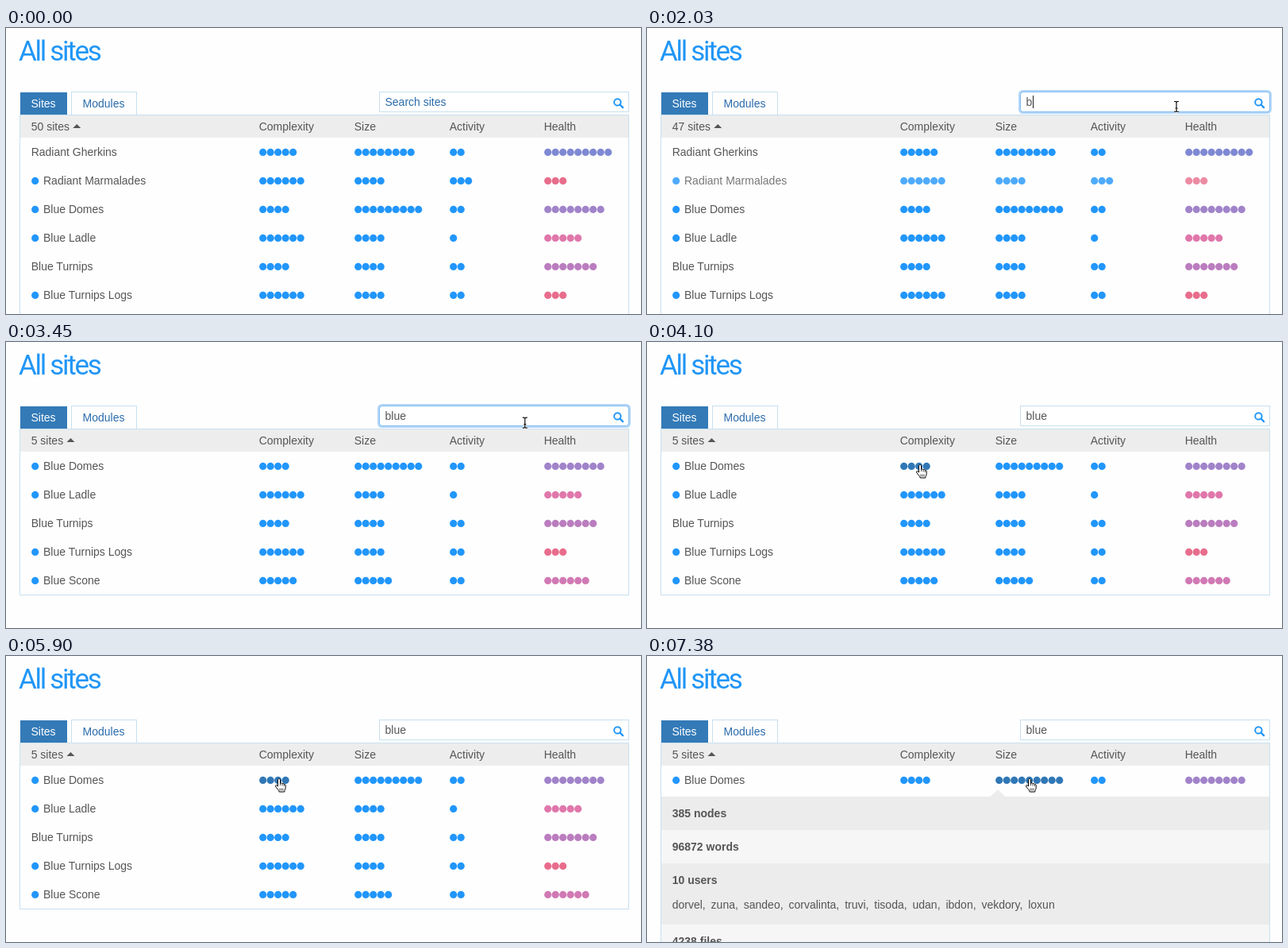
Animation, 800 px wide and 360 px high, one loop 8000 ms. Source, as an HTML page:

```html
<!DOCTYPE html>
<html lang="en">
<head>
<meta charset="utf-8">
<title>All sites</title>
<style>
  html, body { margin: 0; width: 100%; height: 100%; overflow: hidden; background: #fefefe; }
  svg { display: block; }
  text { font: 14px "Liberation Sans", Arial, sans-serif; fill: #555; white-space: pre; }
  .title { font: 35px Roboto, sans-serif; letter-spacing: -2.3px; fill: #2196f6; }
  .bold { font-weight: bold; }
  .list { word-spacing: 3px; }
  .link { fill: #2a6bab; }
  .blue { fill: #2196fb; }
  .hot { fill: #3077b6; }
  .line { fill: none; stroke: #c8e0ef; }
  .cursor { fill: #fff; stroke: #000; stroke-linejoin: round; }
</style>
</head>
<body>
<svg id="stage" width="800" height="360" viewBox="0 0 800 360"></svg>
<script>
const LOOP = 8000, ROW = 36, PANEL_TOP = 177;
const COLS = [319, 439, 559, 678];
const HEALTH = { 3: '#e86d8c', 5: '#e077ab', 6: '#d179b4', 7: '#ba7dbf', 8: '#a183c9', 9: '#7f89d3' };

// name, is child, dots per column
const SITES = [
  ['Radiant Gherkins', 0, [5, 8, 2, 9]],
  ['Radiant Marmalades', 1, [6, 4, 3, 3]],
  ['Blue Domes', 1, [4, 9, 2, 8]],
  ['Blue Ladle', 1, [6, 4, 1, 5]],
  ['Blue Turnips', 0, [4, 4, 2, 7]],
  ['Blue Turnips Logs', 1, [6, 4, 2, 3]],
  ['Blue Scone', 1, [5, 5, 2, 6]]
];

const MODULES = [
  'actions_permissions, admin_menu, admin_menu_toolbar, aggregator, auto_image_style, better_exposed_filters,',
  'block, blog, book, cck, checklistapi, checklistapi_example, clone, color, comment, config_perms, contact,',
  'content_access, content_access_rules, content_migrate, contextual, dashboard, dblog, entity, entity_token, field,',
  'field_collection_table, field_sql_storage, field_ui, file, filter, forum, help, httpbl, image, linkit, list, locale,',
  'mediaelement, memcache, memcache_admin, menu, navigation404, node, number, openid, options, overlay,',
  'panels_extra_layouts, path, permissions_lock, persistent_menu_items, phone, php, poll, profile, rdf, rules,',
  'rules_admin, rules_i18n, rules_scheduler, saferpermissions, search, seo_checklist, shortcut, simpletest,'
];
const USERS = 'dorvel, zuna, sandeo, corvalinta, truvi, tisoda, udan, ibdon, vekdory, loxun';

const stage = document.getElementById('stage');

function add(parent, tag, attrs = {}, text) {
  const el = document.createElementNS('http://www.w3.org/2000/svg', tag);
  for (const k in attrs) el.setAttribute(k, attrs[k]);
  if (text) el.textContent = text;
  return parent.appendChild(el);
}
const group = (parent = stage) => add(parent, 'g');
const label = (parent, x, y, text, cls = '') => add(parent, 'text', { x, y, class: cls }, text);
const box = (parent, x, y, width, height, attrs) => add(parent, 'rect', { x, y, width, height, ...attrs });
const path = (parent, d, attrs) => add(parent, 'path', { d, ...attrs });
const show = (el, on) => el.setAttribute('visibility', on ? 'visible' : 'hidden');
const move = (el, x, y) => el.setAttribute('transform', `translate(${x} ${y})`);

function dots(parent, x, count, attrs) {
  const g = add(parent, 'g', attrs);
  for (let i = 0; i < count; i++) add(g, 'circle', { cx: x + 4.7 + i * 9.5, cy: 0.4, r: 4.6 });
  return g;
}

// Rows
const rows = SITES.map(([name, child, counts]) => {
  const g = group();
  if (child) add(g, 'circle', { cx: 36.7, cy: 0.4, r: 4.6, class: 'blue' });
  label(g, child ? 47 : 31.7, 5, name);
  const cells = counts.map((n, i) =>
    dots(g, COLS[i], n, i < 3 ? { class: 'blue' } : { fill: HEALTH[n] }));
  return { g, cells };
});

// Detail panels
function makePanel(tipX) {
  const g = group();
  path(g, `M${tipX - 10} 177.5l10-9.5 10 9.5z`, { fill: '#ececec' });
  const view = add(g, 'svg', { x: 0, y: PANEL_TOP, width: 800, height: 190, overflow: 'hidden' });
  return { g, view };
}
const modules = makePanel(322), size = makePanel(442);

box(modules.view, 18, 0, 767, 190, { fill: '#ececec' });
const moduleText = group(modules.view);
label(moduleText, 31.7, 26, '94 modules enabled', 'bold');
MODULES.forEach((line, i) => label(moduleText, 31.7, 57 + i * 21, line, 'list'));

[['385 nodes', 0, 42], ['96872 words', 42, 42], ['10 users', 84, 77], ['4238 files', 161, 42]]
  .forEach(([text, y, h], i) => {
    box(size.view, 18, y, 767, h, { fill: i % 2 ? '#f6f6f6' : '#ececec' });
    label(size.view, 31.7, y + 26, text, 'bold');
  });
label(size.view, 31.7, 141, USERS, 'list');

// Page header and table head
label(stage, 16, 41, 'All sites', 'title');
box(stage, 18, 110, 767, 28, { fill: '#ededed' });
const frame = box(stage, 17.5, 109.5, 767, 300, { class: 'line' });
box(stage, 18, 81, 59, 28, { fill: '#337ab7' });
label(stage, 31.5, 100, 'Sites').style.fill = '#fff';
box(stage, 82.5, 80.5, 82, 29, { class: 'line' });
label(stage, 96.5, 100, 'Modules', 'link');
const total = label(stage, 31.7, 129, '');
const sortMark = path(stage, 'M0 5l5-5 5 5z', { fill: '#555' });
['Complexity', 'Size', 'Activity', 'Health'].forEach((t, i) => label(stage, COLS[i] - 0.3, 129, t));

// Search field
box(stage, 470.5, 80.5, 314, 25, { fill: '#fff', stroke: '#c8e0ef' });
const ring = group();
box(ring, 469.5, 79.5, 316, 27, { rx: 4, fill: 'none', stroke: '#b4d7f8', 'stroke-width': 3 });
box(ring, 470.5, 80.5, 314, 25, { rx: 3, fill: 'none', stroke: '#83bdf0' });
const hint = label(stage, 477.5, 98, 'Search sites', 'link');
const query = label(stage, 477.5, 98, '');
const caret = box(stage, 478, 85, 1, 16, { fill: '#222' });
add(stage, 'circle', { cx: 770.4, cy: 93.4, r: 4.2, fill: 'none', stroke: '#2196f6', 'stroke-width': 2 });
path(stage, 'M773.5 96.5l3.6 3.6', { stroke: '#2196f6', 'stroke-width': 2.4, 'stroke-linecap': 'round' });

// Pointers, drawn around their hot spot
const pointers = { arrow: group(), beam: group(), hand: group() };
path(pointers.arrow, 'M0 0v14l3.2-3 2.2 5 2.4-1-2.2-5h4.4z',
  { fill: '#000', stroke: '#fff', 'stroke-linejoin': 'round' });
const beam = 'M-3-6.5h2l1 1 1-1h2M0-5.5v11M-3 6.500h2l1-1 1 1h2M-1.500 2h3';
path(pointers.beam, beam, { fill: 'none', stroke: '#fff', 'stroke-width': 2.6 });
path(pointers.beam, beam, { fill: 'none', stroke: '#111', 'stroke-width': 1.2 });
path(pointers.hand,
  'M-2.500-6c0-2 3-2 3 0v4.500c.5-1 2.300-.8 2.500.4.600-.7 2.200-.4 2.300.7.700-.4 1.900 0 1.900 1.200v3' +
  'c0 2-1.400 2.600-1.400 5.200h-6.600c0-2-3.600-4.600-4.600-7-.5-1.400 1.200-2.100 2.100-.9l.8 1z',
  { class: 'cursor' });
path(pointers.hand, 'M.5-2v3M3-1v2.500M5.300 0v2M0 4.500v3M2 4.500v3M4 4.500v3', { class: 'cursor', 'stroke-width': 0.7 });

// Timing
const between = (t, a, b) => t >= a && t < b;
const part = (t, a, b) => Math.min(1, Math.max(0, (t - a) / (b - a)));
const swing = p => 0.5 - Math.cos(p * Math.PI) / 2;
const lastStep = (steps, t) => steps.reduce((v, [at, next]) => (t >= at ? next : v), steps[0][1]);

const TYPED = [[0, ''], [2030, 'b'], [2200, 'bl'], [2400, 'blu'], [2610, 'blue']];
const TOTALS = [[0, 50], [2030, 47], [2200, 5]];
const MOVES = [
  [660, 1130, 800, 70, 667, 99],
  [3390, 3860, 667, 99, 345, 162],
  [6190, 6550, 345, 162, 483, 162]
];

function pointerAt(t) {
  const [a, b, x0, y0, x1, y1] = MOVES.filter(m => t >= m[0]).pop() || MOVES[0];
  const p = swing(part(t, a, b));
  return [x0 + (x1 - x0) * p, y0 + (y1 - y0) * p];
}

function drawRows(t, panelHeight) {
  const gone = t >= 2730 ? 2 : t >= 2300 ? 1 : 0;
  const push = panelHeight ? panelHeight + 3 : 0;
  rows.forEach(({ g }, i) => {
    const place = i > 1 ? i - gone : i;
    move(g, 0, 156 + place * ROW + (gone === 2 && place > 0 ? push : 0));
  });
  rows[0].g.setAttribute('opacity', 1 - part(t, 2200, 2442));
  rows[1].g.setAttribute('opacity', t < 2030 ? 1 : 1 - part(t, 1960, 2300));
  show(rows[0].g, gone < 2);
  show(rows[1].g, gone < 1);
  frame.setAttribute('height', gone === 2 ? 209 + push : 300);
}

function drawSearch(t) {
  const typed = lastStep(TYPED, t);
  query.textContent = typed;
  show(hint, !typed);
  show(ring, between(t, 1130, 4100));
  show(caret, between(t, 1130, 1670) || between(t, 2030, 3090) || between(t, 3590, 4100));
  caret.setAttribute('x', Math.round(478 + (typed ? query.getComputedTextLength() : 0)));
  total.textContent = lastStep(TOTALS, t) + ' sites';
  move(sortMark, 36 + total.getComputedTextLength(), 121);
}

function drawPointer(t) {
  const [x, y] = pointerAt(t);
  const onRow = y > 148;
  const overFirst = onRow && between(x, 316, 364), overSize = onRow && between(x, 436, 526);
  const inField = x < 785 && between(y, 80, 107);
  const kind = inField ? 'beam' : overFirst || overSize ? 'hand' : 'arrow';
  for (const k in pointers) {
    show(pointers[k], t >= 660 && k === kind);
    move(pointers[k], x, y);
  }
  const { cells } = rows[2];
  cells[0].setAttribute('class', overFirst ? 'hot' : 'blue');
  cells[1].setAttribute('class', overSize ? 'hot' : 'blue');
}

function render(t) {
  const modulesOpen = between(t, 4400, 5900);
  const slide = 300 * swing(part(t, 6860, 7380));
  const sizeOpen = t >= 6910;
  modules.g.style.display = modulesOpen ? '' : 'none';
  show(moduleText, t >= 4820);
  size.g.style.display = sizeOpen ? '' : 'none';
  size.view.setAttribute('height', slide);
  drawRows(t, modulesOpen ? 300 : sizeOpen ? slide : 0);
  drawSearch(t);
  drawPointer(t);
}

const start = performance.now();
function tick() {
  render((performance.now() - start) % LOOP);
  requestAnimationFrame(tick);
}
tick();
</script>
</body>
</html>
```
